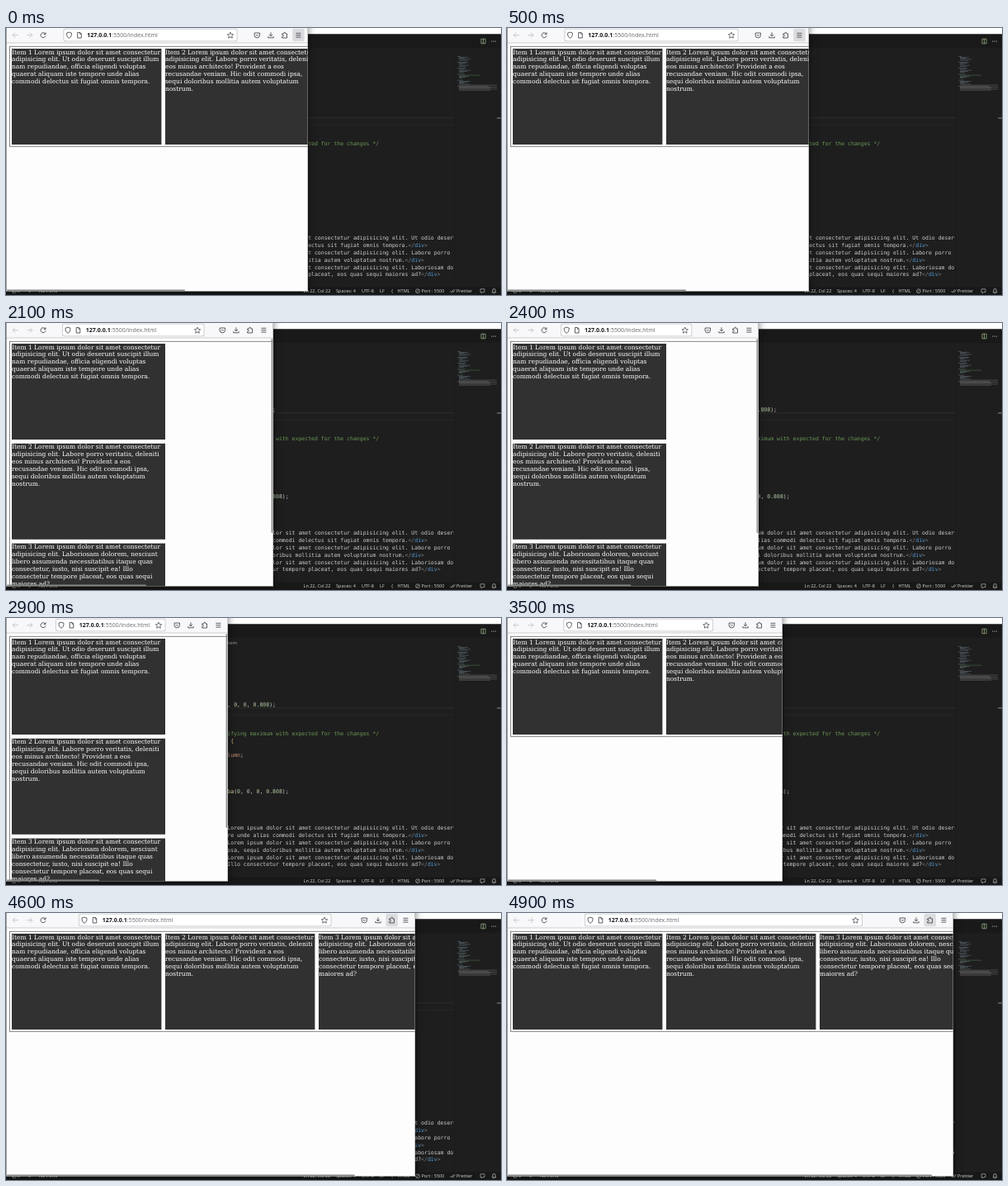
Recreate the animation shown at these times as an HTML page with a canvas. Size 600 px wide and 323 px high, loop 5 s.

```html
<!DOCTYPE html>
<html lang="en">
<head>
<meta charset="utf-8">
<title>Responsive resize</title>
<style>
html, body { margin: 0; width: 100%; height: 100%; overflow: hidden; background: #1e1e1e; }
canvas { display: block; }
</style>
</head>
<body>
<canvas id="stage" width="600" height="323"></canvas>
<script>
const ctx = document.getElementById('stage').getContext('2d');
const LOOP = 5000, BREAKPOINT = 330, BOTTOM = 318.5;
const SERIF = '7.52px "DejaVu Serif", serif';
const MONO = '6.5px "DejaVu Sans Mono", monospace';
const UI = '"Noto Sans", sans-serif';

// [time, browser width]: the drag advances in hard steps
const DRAG = [[0, 366], [2100, 324], [2300, 315], [2400, 305], [2500, 296], [2700, 285],
  [2800, 276], [2900, 269], [3200, 282], [3300, 304], [3500, 334], [3600, 340], [3700, 345],
  [3900, 366], [4000, 398], [4100, 432], [4200, 466], [4300, 492], [4500, 494], [4600, 496],
  [4700, 508], [4800, 525], [4900, 541]];

// [browser width, address bar left, address bar right, scroll thumb end]
const LAYOUT = [[269, 60.5, 193, 113], [324, 68.5, 240, 170], [366, 70, 280, 217],
  [496, 88.5, 394, 423], [541, 94.5, 430.5, 515]];

const INTRO = 'Lorem ipsum dolor sit amet consectetur';
const ITEMS = [
  ['adipisicing elit. Ut odio deserunt suscipit illum', 'nam repudiandae, officia eligendi voluptas',
   'quaerat aliquam iste tempore unde alias', 'commodi delectus sit fugiat omnis tempora.'],
  ['adipisicing elit. Labore porro veritatis, deleniti', 'eos minus architecto! Provident a eos',
   'recusandae veniam. Hic odit commodi ipsa,', 'sequi doloribus mollitia autem voluptatum', 'nostrum.'],
  ['adipisicing elit. Laboriosam dolorem, nesciunt', 'libero assumenda necessitatibus itaque quas',
   'consectetur, iusto, nisi suscipit ea! Illo', 'consectetur tempore placeat, eos quas sequi', 'maiores ad?']
].map((lines, i) => [`Item ${i + 1} ${INTRO}`, ...lines]);

const PLAIN = '#cccccc', GREY = '#808080', BLUE = '#569cd6', GREEN = '#6a9955', NUM = '#b5cea8';
const CLOSE = [['</', GREY], ['div', BLUE], ['>', GREY]];
const ZEROS = [[', ', PLAIN], ['0', NUM], [', ', PLAIN], ['0', NUM], [', ', PLAIN], ['0.808', NUM], [');', PLAIN]];
const CODE = [
  [106.6, ZEROS],
  [141.8, [['ifying maximum with expected for the changes */', GREEN]]],
  [150.6, [[' {', '#d7ba7d']]],
  [168.2, [['lumn', '#ce9178'], [';', PLAIN]]],
  [212.4, [['ba', '#dcdcaa'], ['(', PLAIN], ['0', NUM], ...ZEROS]],
  [256.4, [[INTRO + ' adipisicing elit. Ut odio deserunt', PLAIN]]],
  [265.2, [['re unde alias commodi delectus sit fugiat omnis tempora.', PLAIN], ...CLOSE]],
  [274, [[INTRO + ' adipisicing elit. Labore porro', PLAIN]]],
  [282.8, [['psa, sequi doloribus mollitia autem voluptatum nostrum.', PLAIN], ...CLOSE]],
  [291.6, [[INTRO + ' adipisicing elit. Laboriosam dolorem', PLAIN]]],
  [300.4, [['Illo consectetur tempore placeat, eos quas sequi maiores ad?', PLAIN], ...CLOSE]]
];

// Icons are centred on 0,0
const ICON = {
  back: 'M3.2 0H-3.2M-.4 -3L-3.4 0L-.4 3',
  forward: 'M-3.2 0H3.2M.4 -3L3.4 0L.4 3',
  reload: 'M2.6 -1.6A3 3 0 1 0 3 .6M3 -3.4V-1.2H.8',
  shield: 'M0 -3.6L3 -2.5C3 1 2 2.6 0 3.6C-2 2.6 -3 1 -3 -2.5Z',
  page: 'M-2.3 -3.3H.8L2.3 -1.8V3.3H-2.3ZM.6 -3.3V-1.6H2.3',
  star: 'M0 -3.6L1.1 -1.2L3.7 -.9L1.8 .9L2.3 3.5L0 2.2L-2.3 3.5L-1.8 .9L-3.7 -.9L-1.1 -1.2Z',
  pocket: 'M-3.2 -2.7H3.2V0A3.2 3.2 0 0 1 -3.2 0ZM-1.5 -.7L0 .8L1.5 -.7',
  download: 'M0 -3.4V1.2M-2 -.8L0 1.2L2 -.8M-3.2 1.4V3.1H3.2V1.4',
  puzzle: 'M-3 -1.8H-1V-2.5A1 1 0 0 1 1 -2.5V-1.8H2.8V3.3H-3V1.6H-2A1 1 0 0 0 -2 -.3H-3Z',
  menu: 'M-3 -2.4H3M-3 0H3M-3 2.4H3',
  split: 'M-2.6 -2.8H2.6V2.8H-2.6ZM0 -2.8V2.8',
  bell: 'M-2.4 1.7H2.4L1.7 .6V-1A1.7 1.7 0 0 0 -1.7 -1V.6ZM-.6 2.7H.6',
  person: 'M-2.5 -2.4H2.5V1.3H.3L-1.2 2.8V1.3H-2.5Z',
  blocked: 'M2.4 0A2.4 2.4 0 1 1 -2.4 0A2.4 2.4 0 1 1 2.4 0M-1.7 1.7L1.7 -1.7',
  checks: 'M-3 .2L-1.7 1.7L1 -1.7M0 1.5L.3 1.7L3 -1.7'
};

function rect(x, y, w, h, color) {
  ctx.fillStyle = color;
  ctx.fillRect(x, y, w, h);
}

function round(x, y, w, h, r, color) {
  ctx.beginPath();
  ctx.roundRect(x, y, w, h, r);
  ctx.fillStyle = color;
  ctx.fill();
}

function text(str, x, y, font, color) {
  ctx.font = font;
  ctx.fillStyle = color;
  ctx.fillText(str, x, y);
  return x + ctx.measureText(str).width;
}

function icon(name, x, y, color, width = 0.9) {
  ctx.save();
  ctx.translate(x, y);
  ctx.strokeStyle = color;
  ctx.lineWidth = width;
  ctx.stroke(new Path2D(ICON[name]));
  ctx.restore();
}

function clip(x, y, w, h, draw) {
  ctx.save();
  ctx.beginPath();
  ctx.rect(x, y, w, h);
  ctx.clip();
  draw();
  ctx.restore();
}

function layoutAt(width) {
  let i = 1;
  while (i < LAYOUT.length - 1 && width > LAYOUT[i][0]) i++;
  const a = LAYOUT[i - 1], b = LAYOUT[i], k = (width - a[0]) / (b[0] - a[0]);
  return a.map((v, j) => v + (b[j] - v) * k);
}

function drawMinimap() {
  for (let i = 0; i < 36; i++) {
    const y = 34 + i * 1.2, long = i > 28 && i < 35;
    const indent = i % 6 && i < 35 ? 2 : 0;
    const length = long ? (i % 2 ? 46 : 38) : i === 19 ? 26 : 4 + (i * 7) % 11;
    if (i % 6 === 5 && !long) continue;
    rect(547 + indent, y, length, 0.6, long ? '#686868' : i === 19 ? '#4c6b42' : '#58646c');
  }
}

function drawEditor() {
  rect(0, 0, 600, 323, '#1e1e1e');
  rect(0, 0, 600, 7.5, '#ffffff');
  rect(0, 7.5, 600, 16.5, '#191919');
  icon('split', 578.5, 16, '#93ad85', 0.8);
  for (let i = 0; i < 3; i++) rect(588.3 + i * 2.3, 15.6, 1, 1, '#cccccc');
  text('item', 267.5, 31.5, `6px ${UI}`, '#9d9d9d');

  rect(0, 108.4, 543, 0.8, '#303030');
  rect(0, 116.6, 543, 0.8, '#2a2a2a');
  rect(543, 33, 0.8, 280, '#191919');
  rect(595, 108.5, 5, 1, '#8a8a8a');
  clip(0, 24, 543, 290, () => {
    for (const [y, parts] of CODE) {
      let x = 268.3;
      for (const [str, color] of parts) x = text(str, x, y, MONO, color);
    }
  });
  drawMinimap();

  rect(0, 313.5, 600, 9.5, '#181818');
  const status = [[14, '0'], [27, '0'], [40, 'No Ports'], [360.5, 'Ln 22, Col 22'], [400, 'Spaces: 4'],
    [431, 'UTF-8'], [453, 'LF'], [467, '{'], [474.5, 'HTML'], [503.5, 'Port : 5500'], [546, 'Prettier']];
  for (const [x, str] of status) text(str, x, 320.2, `5.5px ${UI}`, '#cccccc');
  icon('blocked', 10, 318.2, '#cccccc', 0.6);
  icon('blocked', 499, 318.2, '#cccccc', 0.6);
  icon('checks', 541.5, 318.2, '#cccccc', 0.7);
  icon('person', 577.5, 318.2, '#cccccc', 0.6);
  icon('bell', 591.5, 318.2, '#cccccc', 0.7);
}

function drawToolbar(width, left, right, hover) {
  const dark = '#4b4b52';
  rect(0, 0, width, 18, '#f8f8fa');
  rect(0, 17.5, width, 1, '#cfcfd4');
  icon('back', 11.5, 8.7, '#c2c2c6');
  icon('forward', 28.5, 8.7, '#c2c2c6');
  icon('reload', 45, 8.7, dark);

  round(left - 0.5, 0.8, right - left + 1, 15.4, 2.5, '#c4c4ca');
  round(left + 0.3, 1.6, right - left - 0.6, 13.8, 2, '#ffffff');
  icon('shield', left + 6.5, 8.7, dark);
  icon('page', left + 19, 8.7, dark);
  const x = text('127.0.0.1', left + 28.3, 11.2, `600 7px ${UI}`, '#15141a');
  text(':5500/index.html', x, 11.2, `7px ${UI}`, '#737378');
  icon('star', right - 8, 8.7, dark, 0.8);

  ['pocket', 'download', 'puzzle', 'menu'].forEach((name, i) => {
    const cx = width - 61.7 + i * 16.7;
    if (name === hover) round(cx - 7.2, 0.8, 14.4, 15.4, 2, '#dcdce0');
    icon(name, cx, 8.7, dark);
  });
}

function drawPage(width, thumb) {
  const column = width < BREAKPOINT;
  ctx.strokeStyle = '#6a6a6a';
  ctx.lineWidth = 0.8;
  ctx.strokeRect(4.5, 22.3, 700, column ? 370 : 121);

  ITEMS.forEach((lines, i) => {
    const x = column ? 7 : 7 + i * 186, y = column ? 25 + i * 120.8 : 25;
    rect(x, y, column ? 186 : 181.4, 116, '#313131');
    lines.forEach((line, j) => text(line, x, y + 6.6 + j * 8.88, SERIF, '#ffffff'));
  });

  if (column) round(width - 2.4, 19, 1.6, 235, 1, '#8f8f92');
  round(1, 316.4, thumb - 1, 1.7, 1, '#858588');
}

function drawBrowser(width, hover) {
  const [, left, right, thumb] = layoutAt(width);
  ctx.save();
  ctx.shadowColor = 'rgba(0,0,0,.5)';
  ctx.shadowBlur = 9;
  rect(0, -10, width, BOTTOM + 10, '#fefdfd');
  ctx.restore();
  clip(0, 0, width, BOTTOM, () => {
    drawPage(width, thumb);
    drawToolbar(width, left, right, hover);
  });
  rect(0, 0, 0.7, BOTTOM, '#777777');
  rect(width - 0.5, 0, 0.5, BOTTOM, '#9a9a9a');
}

function frame() {
  const t = performance.now() % LOOP;
  const width = DRAG.filter(step => step[0] <= t).pop()[1];
  const hover = t < 1000 ? 'menu' : t >= 4500 ? 'puzzle' : '';
  drawEditor();
  drawBrowser(width, hover);
  requestAnimationFrame(frame);
}
frame();
</script>
</body>
</html>
```
